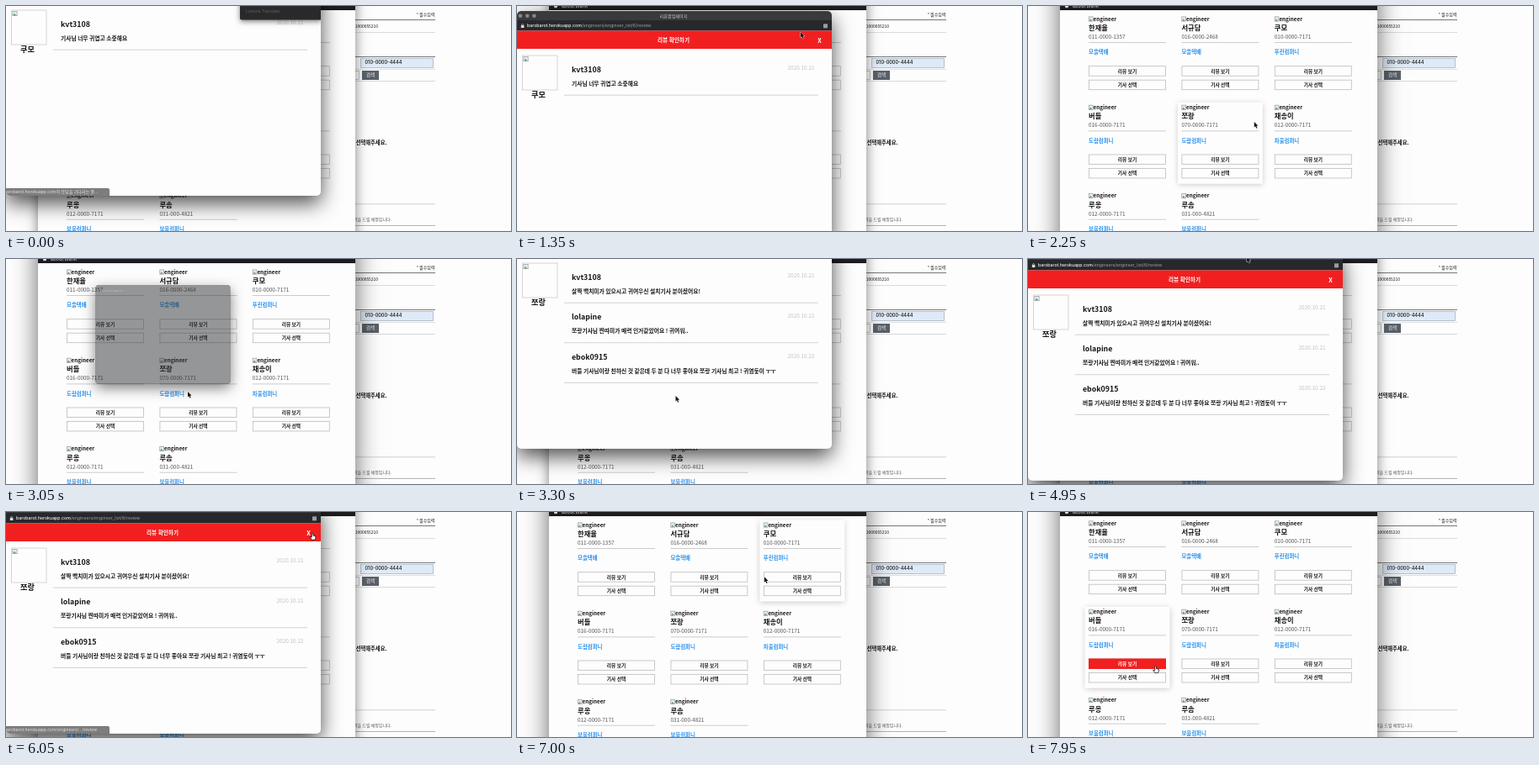
Write an HTML page with a canvas that moves like this. It is 600 px wide and 268 px high and loops after 8 s.

```html
<!DOCTYPE html>
<html lang="ko">
<head>
<meta charset="utf-8">
<title>리뷰 팝업</title>
<style>
html, body { margin: 0; width: 100%; height: 100%; overflow: hidden; background: #fdfdfd; }
canvas { display: block; width: 600px; height: 268px; }
</style>
</head>
<body>
<canvas id="stage" width="600" height="268"></canvas>
<script>
const ctx = document.getElementById('stage').getContext('2d');
const LOOP = 8000, STEP = 50;
const KR = '"Noto Sans CJK KR", "Noto Sans CJK", sans-serif';
const UI = 'Inter, "Noto Sans CJK KR", sans-serif';
const PAPER = '#fdfdfd', INK = '#151515', RED = '#f21f20', BLUE = '#2a92ee', RULE = '#cecece';
const HOST = 'barobarot.herokuapp.com';
const WIN_W = 374, WIN_H = 274, HOME = -48;

const cards = [
  ['한재율', '011-0000-1357', '모솔택배'],
  ['서규담', '016-0000-2468', '모솔택배'],
  ['쿠모', '010-0000-7171', '푸린컴퍼니'],
  ['버들', '016-0000-7171', '도람컴퍼니'],
  ['쪼랑', '070-0000-7171', '도람컴퍼니'],
  ['채송이', '012-0000-7171', '차울컴퍼니'],
  ['루옹', '012-0000-7171', '보윰컴퍼니'],
  ['루솜', '031-000-4821', '보윰컴퍼니']
];

const first = {
  id: 6, name: '쿠모',
  reviews: [['kvt3108', '2020.10.21', '기사님 너무 귀엽고 소중해요']]
};
const second = {
  id: 8, name: '쪼랑',
  reviews: [
    ['kvt3108', '2020.10.21', '살짝 백치미가 있으시고 귀여우신 설치기사 분이셨어요!'],
    ['lolapine', '2020.10.21', '쪼랑기사님 찐따미가 매력 인거같았어요 ! 귀여워..'],
    ['ebok0915', '2020.10.22', '버들 기사님이랑 친하신 것 같은데 두 분 다 너무 좋아요 쪼랑 기사님 최고 ! 귀염둥이 ㅜㅜ']
  ]
};

// time, x, y of the pointer tip
const path = [
  [0, 306, -41], [350, 300, -41], [850, 300, 13], [1100, 320, 27], [1350, 337, 31],
  [1600, 358, 39], [1900, 359, 40], [2450, 230, 180], [2750, 230, 181],
  [3050, 216, 158], [3300, 188.5, 163], [3450, 188.5, 163], [4050, 260, -41],
  [4400, 260, -41], [4700, 260, -3], [4950, 260, -3], [5300, 300, 10],
  [5800, 364, 25], [6750, 364, 25], [7400, 151.5, 183.5], [8000, 151.5, 183.5]
];

const clamp = v => Math.max(0, Math.min(1, v));
const ramp = (t, a, b) => clamp((t - a) / (b - a));
const ease = p => p * p * (3 - 2 * p);
const within = (t, a, b) => t >= a && t < b;

function pointer(t) {
  let i = 0;
  while (i < path.length - 2 && path[i + 1][0] <= t) i++;
  const [a, ax, ay] = path[i], [b, bx, by] = path[i + 1];
  const p = ease(ramp(t, a, b));
  return [ax + (bx - ax) * p, ay + (by - ay) * p];
}

// Type is set ten times larger and scaled down for even spacing.
function text(s, x, y, size, color = INK, { weight = 400, align = 'left', font = KR } = {}) {
  ctx.save();
  ctx.translate(x, y);
  ctx.scale(0.1, 0.1);
  ctx.font = `${weight} ${size * 10}px ${font}`;
  ctx.textAlign = align;
  ctx.textBaseline = 'middle';
  ctx.fillStyle = color;
  ctx.fillText(s, 0, 0);
  const w = ctx.measureText(s).width / 10;
  ctx.restore();
  return w;
}

function box(x, y, w, h, fill) {
  ctx.fillStyle = fill;
  ctx.fillRect(x, y, w, h);
}

function frame(x, y, w, h, color) {
  ctx.strokeStyle = color;
  ctx.lineWidth = 0.8;
  ctx.strokeRect(x + 0.5, y + 0.5, w - 1, h - 1);
}

function round(x, y, w, h, r, fill) {
  ctx.beginPath();
  ctx.roundRect(x, y, w, h, r);
  ctx.fillStyle = fill;
  ctx.fill();
}

function dot(x, y, r, fill) {
  ctx.beginPath();
  ctx.arc(x, y, r, 0, 7);
  ctx.fillStyle = fill;
  ctx.fill();
}

function shadowed(alpha, blur, dy, draw) {
  ctx.save();
  ctx.shadowColor = `rgba(0,0,0,${alpha})`;
  ctx.shadowBlur = blur;
  ctx.shadowOffsetY = dy;
  draw();
  ctx.restore();
}

function brokenImage(x, y, w, h) {
  box(x, y, w, h, '#9a9a9a');
  box(x + 0.7, y + 0.7, w - 1.4, h - 1.4, '#e3edf8');
  ctx.beginPath();
  ctx.moveTo(x + 0.7, y + h - 0.7);
  ctx.lineTo(x + w * 0.45, y + h * 0.45);
  ctx.lineTo(x + w * 0.75, y + h - 0.7);
  ctx.fillStyle = '#6d9b6a';
  ctx.fill();
}

function form() {
  box(0, 0, 600, 268, PAPER);
  text('* 필수입력', 509.5, 10.3, 5, INK, { align: 'right' });
  box(400, 16, 110, 1, '#777');
  text('1000055210', 442, 24, 4.9, INK, { align: 'right' });
  box(400, 31, 110, 0.8, '#d2d2d2');
  box(400, 60, 110, 1, '#777');
  box(421, 62, 87, 12, '#dfeaf8');
  frame(421, 62, 87, 12, '#a9b6c4');
  text('010-0000-4444', 426.5, 67.7, 5.6, INK, { weight: 500, font: UI });
  box(400, 75, 110, 0.7, '#d2d2d2');
  frame(380, 77, 40, 11, '#bbb');
  box(423, 77, 20, 11, '#596068');
  text('검색', 433, 82.2, 5.5, '#fff', { align: 'center' });
  box(400, 89, 110, 0.8, '#cfcfcf');
  text('엔지니어를 선택해주세요.', 452.5, 162.5, 6.3, INK, { weight: 700, align: 'right' });
  box(400, 235.5, 110, 0.8, '#c4c4c4');
  text('연락을 드릴 예정입니다.', 458, 254, 5, '#555', { align: 'right' });
  box(400, 261, 110, 0.9, '#aaa');
}

function button(label, x, y, red) {
  frame(x, y, 92, 12.5, '#bcbcbc');
  if (red > 0) {
    ctx.globalAlpha = red;
    box(x, y, 92, 12.5, RED);
    ctx.globalAlpha = 1;
  }
  text(label, x + 46, y + 6.2, 5.7, red > 0.5 ? '#fff' : INK, { weight: 700, align: 'center' });
}

function card([name, phone, company], x, y, hover, red) {
  if (hover) {
    shadowed(0.22, 7, 1, () => box(x - 4.5, y - 3, 101, 97, PAPER));
  }
  brokenImage(x, y, 5.5, 6);
  text('engineer', x + 5.6, y + 3, 6.3, INK, { weight: 700 });
  text(name, x, y + 13.5, 8.3, INK, { weight: 700 });
  text(phone, x, y + 24, 6.4, '#555');
  box(x, y + 30.7, 92, 0.8, '#c0c0c0');
  text(company, x, y + 42.5, 6.4, BLUE, { weight: 700 });
  button('리뷰 보기', x, y + 58.7, red);
  button('기사 선택', x, y + 75.2, 0);
}

function list(t, active, [px, py]) {
  const shade = active ? [0.6, 28, 9] : [0.5, 14, 5];
  shadowed(...shade, () => box(38, -60, 377, 380, PAPER));
  ctx.save();
  ctx.beginPath();
  ctx.rect(38, 0, 377, 268);
  ctx.clip();
  const scroll = 2 * ramp(t, 7750, 7950);
  const fades = { 3: ramp(t, 7500, 7650), 4: within(t, 2400, 2900) ? ramp(t, 2380, 2500) : 0 };
  cards.forEach((c, i) => {
    const x = 72 + (i % 3) * 110.4, y = 12.5 + Math.floor(i / 3) * 105.3 - scroll;
    const inside = px > x - 4 && px < x + 96 && py > y - 3 && py < y + 94;
    card(c, x, y, inside && active && !within(t, 2900, 3150), fades[i] || 0);
  });
  box(38, -20, 377, 25, '#1d1d1f');
  dot(46, 0, 2.2, '#ddd');
  text('about:blank', 53, 0, 5.6, '#ddd', { font: UI });
  ctx.restore();
}

function status(label, y, alpha) {
  if (alpha <= 0) return;
  ctx.globalAlpha *= alpha;
  round(-4, y, 127, 9, [0, 2, 0, 0], '#7d7d7d');
  text(label, -2, y + 4.6, 5, '#e4e4e4', { font: UI });
}

function review(data, top, { alpha = 1, bubble = false, label = '', labelAlpha = 0 }) {
  ctx.save();
  ctx.globalAlpha = alpha;
  shadowed(0.7, 25, 9, () => round(0, top, WIN_W, WIN_H, 5, PAPER));
  ctx.beginPath();
  ctx.roundRect(0, top, WIN_W, WIN_H, 5);
  ctx.clip();
  ctx.translate(0, top);

  box(0, 0, WIN_W, 11, '#3a3a3c');
  for (let i = 0; i < 3; i++) dot(4 + i * 8.2, 5.7, 2.3, '#88888b');
  text('리뷰팝업페이지', 186, 5.6, 5.1, '#c8c8c8', { align: 'center' });
  box(0, 11, WIN_W, 12.5, '#27282b');
  round(4.8, 17, 3.6, 3, 0.5, '#ddd');
  ctx.strokeStyle = '#ddd';
  ctx.lineWidth = 0.7;
  ctx.beginPath();
  ctx.arc(6.6, 16.8, 1.2, Math.PI, 0);
  ctx.stroke();
  const w = text(HOST, 12, 17.8, 5.2, '#f4f4f4', { weight: 500, font: UI });
  text(`/engineers/engineer_list/${data.id}/review`, 12 + w, 17.8, 5.2, '#a2a2a5', { font: UI });
  box(364, 15.3, 5, 5, '#9b9da0');

  box(0, 23.5, WIN_W, 21.5, RED);
  text('리뷰 확인하기', 186, 34.5, 6.6, '#fff', { weight: 700, align: 'center' });
  text('X', 359.5, 34.8, 7.2, '#fff', { weight: 700, align: 'center' });

  frame(6, 52.5, 42.5, 42, '#cacaca');
  brokenImage(7.5, 54, 6, 6);
  text(data.name, 17, 100, 9.2, INK, { weight: 700 });
  data.reviews.forEach(([id, date, body], i) => {
    const y = i * 47.6;
    text(id, 65, y + 69.5, 8.8, INK, { weight: 700 });
    text(date, 353.5, y + 68, 6.4, '#c2c2c2', { align: 'right' });
    text(body, 65, y + 86, 6.75, INK, { weight: 700 });
    box(56, y + 99.7, 302, 0.9, RULE);
  });

  if (bubble) {
    shadowed(0.5, 6, 2, () => round(278, 20, 97, 44.5, 2, '#29292b'));
    text('Lumora Translate', 285, 54.3, 4.9, '#626265', { font: UI });
  }
  status(label, WIN_H - 9, labelAlpha);
  ctx.restore();
}

// A see-through pane grows from the middle; its shadow falls outside only.
function opening(p) {
  const s = 0.14 + 0.86 * p, x = -WIN_W / 2, y = -WIN_H / 2;
  ctx.save();
  ctx.translate(186.5, 90);
  ctx.scale(s, s);
  ctx.save();
  ctx.beginPath();
  ctx.rect(-600, -600, 1200, 1200);
  ctx.roundRect(x, y, WIN_W, WIN_H, 5);
  ctx.clip('evenodd');
  shadowed(0.5, 16, 5, () => round(x, y, WIN_W, WIN_H, 5, '#000'));
  ctx.restore();
  ctx.globalAlpha = 0.35 + 0.45 * p;
  round(x, y, WIN_W, WIN_H, 5, '#2e3135');
  text(HOST, x + 12, y + 17, 5.2, '#eee', { font: UI });
  ctx.restore();
}

function cursor([x, y], hand) {
  ctx.save();
  ctx.translate(x, y);
  ctx.lineJoin = 'round';
  ctx.lineWidth = 0.8;
  ctx.beginPath();
  if (hand) {
    ctx.moveTo(-0.8, 0.3);
    ctx.quadraticCurveTo(0, -0.6, 0.8, 0.3);
    ctx.lineTo(1, 3);
    ctx.lineTo(3.8, 3.8);
    ctx.lineTo(4, 6);
    ctx.lineTo(2.9, 8.2);
    ctx.lineTo(-0.7, 8.2);
    ctx.lineTo(-2.8, 4.7);
    ctx.lineTo(-0.7, 5);
    ctx.closePath();
    ctx.fillStyle = '#fff';
    ctx.strokeStyle = '#111';
    ctx.fill();
    ctx.stroke();
  } else {
    ctx.moveTo(0, 0);
    ctx.lineTo(0, 6.5);
    ctx.lineTo(1.5, 5.2);
    ctx.lineTo(2.6, 7.7);
    ctx.lineTo(3.7, 7.2);
    ctx.lineTo(2.6, 4.8);
    ctx.lineTo(4.6, 4.7);
    ctx.closePath();
    ctx.fillStyle = '#111';
    ctx.strokeStyle = '#fff';
    ctx.stroke();
    ctx.fill();
  }
  ctx.restore();
}

function draw(t) {
  const tip = pointer(t);
  const active = within(t, 1900, 3150) || t >= 6800;
  const waiting = HOST + '의 응답을 기다리는 중...';
  form();
  list(t, active, tip);

  if (t < 2050) {
    review(first, HOME + 54 * ease(ramp(t, 350, 850)), {
      alpha: 1 - ramp(t, 1900, 2050),
      bubble: t < 300,
      label: waiting,
      labelAlpha: 1 - ramp(t, 100, 250)
    });
  } else if (within(t, 3000, 3150)) {
    opening(ramp(t, 3000, 3150));
  } else if (within(t, 3150, 6950)) {
    const linked = t > 5000;
    review(second, HOME + 38 * ease(ramp(t, 4350, 4700)), {
      alpha: 1 - ramp(t, 6800, 6950),
      bubble: within(t, 3500, 4050),
      label: linked ? HOST + '/engineers/.../review' : waiting,
      labelAlpha: linked ? ramp(t, 5900, 6050) : ramp(t, 3450, 3550) * (1 - ramp(t, 3750, 3900))
    });
  }

  const hand = within(t, 1550, 1950) || within(t, 2400, 2850) || within(t, 5750, 6850) || t >= 7500;
  cursor(tip, hand);
}

const start = performance.now();
function tick() {
  const t = (performance.now() - start) % LOOP;
  draw(Math.floor(t / STEP) * STEP);
  requestAnimationFrame(tick);
}
tick();
</script>
</body>
</html>
```
